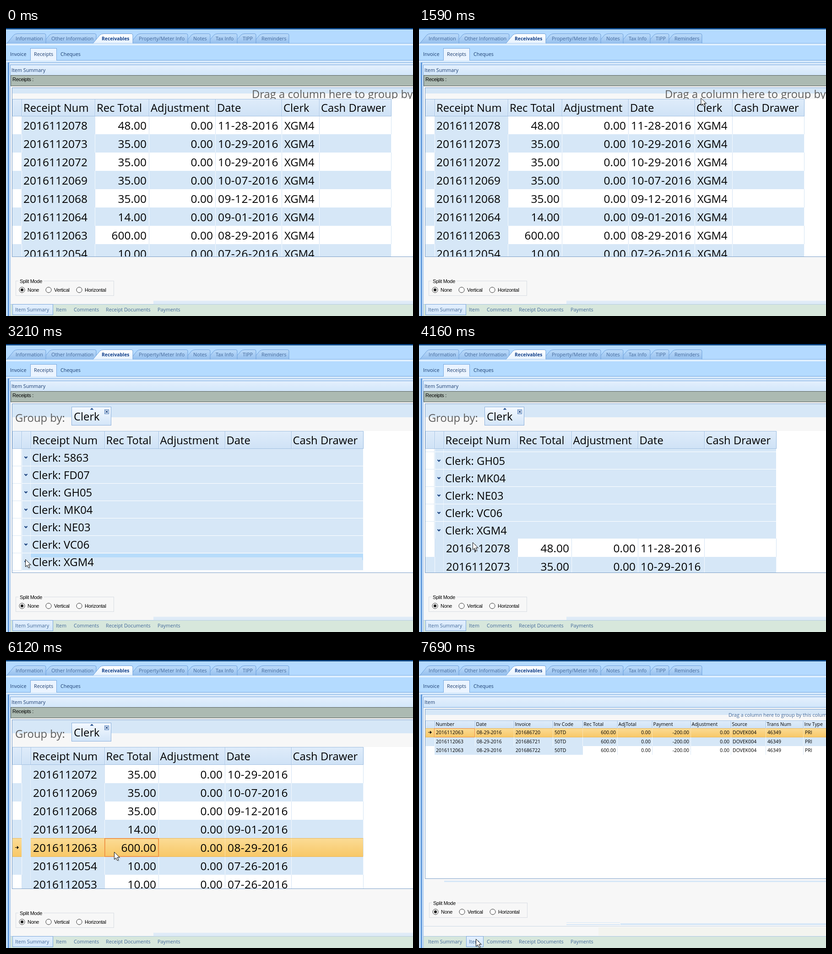
These frames come from a looping animation (889 by 629 pixels, 8000 ms). An HTML page:

```html
<!DOCTYPE html>
<html lang="en">
<head>
<meta charset="utf-8">
<title>Receipts grid</title>
<style>
html, body { margin: 0; width: 100%; height: 100%; overflow: hidden; background: #f7f7f7; }
svg { display: block; width: 889px; height: 629px; }
rect { shape-rendering: crispEdges; }
text { font-family: "Open Sans", "Noto Sans", sans-serif; white-space: pre; }
.big { font-size: 23.8px; fill: #000; }
.num { font-size: 24.5px; fill: #000; }
.date { font-size: 24.5px; fill: #000; letter-spacing: .4px; }
.hint { fill: #5c5c5c; }
.tab { font-size: 10.8px; fill: #44699a; }
.on { font-weight: 700; fill: #15428b; font-size: 10.3px; }
.nav { font-size: 10.8px; fill: #1b3d70; }
.cell { font-size: 10.5px; fill: #000; }
.form { font: 11px "Liberation Sans", Arial, sans-serif; letter-spacing: -.3px; fill: #000; }

.anim, .scene { animation: 8s infinite step-end; }
.flat { animation-name: flat; }
.grouped { animation-name: grouped; }
.item { animation-name: item; }
.summary { animation-name: summary; }
.hover { animation-name: hover; }
.children { animation-name: children; }
.picked { animation-name: picked; }
.scroll { animation-name: scroll; }
#cursor { animation: move 8s infinite ease-in-out, appear 8s infinite step-end; }

@keyframes flat { 0% { visibility: visible } 25.5%, 100% { visibility: hidden } }
@keyframes grouped { 0% { visibility: hidden } 25.5% { visibility: visible } 96.125%, 100% { visibility: hidden } }
@keyframes item { 0% { visibility: hidden } 96.125%, 100% { visibility: visible } }
@keyframes summary { 0% { visibility: visible } 96.125%, 100% { visibility: hidden } }
@keyframes hover { 0% { opacity: 0 } 39.375% { opacity: 1 } 50.375%, 100% { opacity: 0 } }
@keyframes children { 0% { opacity: 0 } 50.375%, 100% { opacity: 1 } }
@keyframes picked { 0% { opacity: 0 } 76.5%, 100% { opacity: 1 } }
@keyframes scroll {
  0% { transform: translateY(0) }
  50.375% { transform: translateY(-69px) }
  53.625% { transform: translateY(-138px) }
  57.75% { transform: translateY(-207px) }
  58.5% { transform: translateY(-276px) }
  65%, 100% { transform: translateY(-345px) }
}
@keyframes appear { 0% { visibility: hidden } 2.5%, 100% { visibility: visible } }
@keyframes move {
  0%, 2.5% { transform: translate(11px, 122px); animation-timing-function: ease-in }
  5.5% { transform: translate(380px, 140px); animation-timing-function: ease-out }
  8.5% { transform: translate(753px, 158px) }
  10.75%, 13.875% { transform: translate(642px, 170px) }
  23%, 29.5% { transform: translate(607px, 147px) }
  39.375%, 43% { transform: translate(42px, 470px) }
  49.625%, 64.125% { transform: translate(117px, 433px) }
  71.625%, 82.25% { transform: translate(236px, 419px) }
  92.125%, 100% { transform: translate(124px, 609px) }
}
</style>
</head>
<body>
<svg id="stage" viewBox="0 0 889 629" xmlns="http://www.w3.org/2000/svg"></svg>
<script>
const BLUE = '#d6e7f7', LINE = '#a3c1e2', EDGE = '#7b9fc9';

const rect = (x, y, w, h, fill, stroke) => stroke
  ? `<rect x="${x + .5}" y="${y + .5}" width="${w - 1}" height="${h - 1}" fill="${fill}" stroke="${stroke}"/>`
  : `<rect x="${x}" y="${y}" width="${w}" height="${h}" fill="${fill}"/>`;
const text = (x, y, s, cls, end) =>
  `<text x="${x}" y="${y}" class="${cls}"${end ? ' text-anchor="end"' : ''}>${s}</text>`;
const path = (d, fill, stroke = 'none', width = 1) =>
  `<path d="${d}" fill="${fill}" stroke="${stroke}" stroke-width="${width}"/>`;
const group = (cls, body) => `<g class="${cls}">${body}</g>`;
const grad = (id, top, bottom) =>
  `<linearGradient id="${id}" x1="0" y1="0" x2="0" y2="1"><stop stop-color="${top}"/><stop offset="1" stop-color="${bottom}"/></linearGradient>`;
const clip = (id, x, y, w, h) =>
  `<clipPath id="${id}"><rect x="${x}" y="${y}" width="${w}" height="${h}"/></clipPath>`;
const marker = (x, y) => path(`M${x} ${y}h4v-3l4 3.5l-4 3.5v-3h-4z`, '#000');

const receipts = [
  ['2078', '48.00', '11-28-2016'], ['2073', '35.00', '10-29-2016'],
  ['2072', '35.00', '10-29-2016'], ['2069', '35.00', '10-07-2016'],
  ['2068', '35.00', '09-12-2016'], ['2064', '14.00', '09-01-2016'],
  ['2063', '600.00', '08-29-2016'], ['2054', '10.00', '07-26-2016'],
  ['2053', '10.00', '07-26-2016']
];
const clerks = ['5863', 'FD07', 'GH05', 'MK04', 'NE03', 'VC06', 'XGM4'];
const flatCols = [34, 194, 312, 457, 602, 684, 841];
const groupCols = [54, 215, 333, 478, 623, 780];

function header(y, h, cols, names, base, cls, pad) {
  const edges = [14, ...cols], first = cols.length - 1 - names.length;
  let out = rect(14, y, edges.at(-1) - 14, h, 'url(#head)');
  for (const x of edges) out += rect(x, y, 1, h, LINE) + rect(x + 1, y + 1, 1, h - 2, '#eef6fe');
  out += rect(14, y, edges.at(-1) - 13, 1, LINE) + rect(14, y + h - 1, edges.at(-1) - 13, 1, LINE);
  names.forEach((s, i) => out += text(cols[first + i] + pad, base, s, cls));
  return out;
}

function rowText(y, r, c) {
  const base = y + 30, left = c[0] === 54 ? 59 : 38;
  return text(left, base, '201611' + r[0], 'num') + text(c[2] - 5, base, r[1], 'num', 1) +
    text(c[3] - 5, base, '0.00', 'num', 1) + text(c[3] + 6, base, r[2], 'date');
}

function dataRow(y, i, r, c) {
  const odd = i % 2, right = c.at(-1);
  let out = rect(14, y, right - 14, 40, odd ? BLUE : '#fff') + rect(34, y, c[1] - 34, 40, BLUE);
  for (const x of [34, ...c.slice(1)]) out += rect(x, y, 1, 40, odd ? '#f4f9fe' : '#d3e3f3');
  if (c[0] === 54) out += rect(53, y, 1, 40, '#e6f0fa');
  return out + rowText(y, r, c);
}

function tab(label, x, right, active) {
  const top = 12.5, d = `M${x - 19} 33.5L${x - 4} 15.5Q${x - 1} ${top} ${x + 4} ${top}H${right - 3}Q${right} ${top} ${right} 16V33.5`;
  return path(d, active ? 'url(#tabOn)' : 'url(#tabOff)', '#6c9fda') +
    text(x, 27, label, active ? 'tab on' : 'tab');
}

function frame() {
  let out = rect(0, 0, 889, 629, '#f7f7f7') + rect(0, 0, 889, 36, '#b4daff') +
    rect(0, 0, 889, 3, '#0c447f') + rect(0, 33, 889, 1, '#7eb0e6') + rect(0, 34, 889, 4, '#e0f0ff') +
    rect(0, 38, 889, 33, '#b4dbff') + rect(0, 70, 889, 1, '#78a9df') + rect(0, 71, 889, 4, '#d8eafc');
  const tabs = [['Information', 21, 87], ['Other Information', 99, 197], ['Property/Meter Info', 290, 397],
    ['Notes', 409, 446], ['Tax Info', 458, 505], ['TIPP', 517, 546], ['Reminders', 558, 618]];
  for (const t of tabs.reverse()) out += tab(...t);
  out += tab('Receivables', 209, 277, true);
  out += rect(53, 44, 58, 27, '#ebf4ff', '#78a9df') + rect(54, 70, 56, 1, '#ebf4ff');
  out += text(9, 61, 'Invoice', 'nav') + text(61, 61, 'Receipts', 'nav') + text(119, 61, 'Cheques', 'nav');
  out += rect(0, 75, 4, 554, '#bcdbf8') + rect(4, 75, 885, 1, '#78a9df') + rect(4, 76, 885, 4, '#dcebfb') +
    rect(4, 75, 3, 554, '#6199dc') + rect(7, 80, 2, 549, '#dcebfb') + rect(9, 80, 1, 549, '#8fb6e4');
  out += rect(9, 80, 890, 24, 'url(#caption)', '#70a4df');
  out += rect(10, 603, 879, 26, '#d7e7dc') + rect(10, 603, 879, 1, '#aac6e2');
  return out;
}

function bottomTabs(x, w) {
  const labels = [['Item Summary', 20], ['Item', 109], ['Comments', 148], ['Receipt Documents', 218], ['Payments', 331]];
  return rect(x, 603, w, 24, 'url(#caption)', '#79a6dd') +
    labels.map(([s, tx]) => text(tx, 619, s, 'tab')).join('');
}

function splitMode(dx, dy) {
  const modes = [['None', 35], ['Vertical', 93], ['Horizontal', 160]];
  let out = rect(21, 552, 215, 33, 'none', '#d8dde3') + rect(27, 550, 55, 6, '#f7f7f7') + text(30, 557, 'Split Mode', 'form');
  modes.forEach(([s, x], i) => {
    out += `<circle cx="${x}" cy="572" r="6" fill="#fff" stroke="#333"/>`;
    if (!i) out += `<circle cx="${x}" cy="572" r="3.2" fill="#222"/>`;
    out += text(x + 12, 576, s, 'form');
  });
  return `<g transform="translate(${dx} ${dy})">${out}</g>`;
}

const summaryPage = () =>
  text(12, 96, 'Item Summary', 'nav') + rect(10, 103, 890, 24, '#acbab2', '#59615d') +
  text(14, 116, 'Receipts :', 'form') + rect(13, 130, 890, 370, '#fff', EDGE) +
  splitMode(0, 0) + rect(322, 596, 567, 2, BLUE) + rect(322, 599, 567, 3, BLUE) + bottomTabs(14, 89);

function flatGrid() {
  const names = ['Receipt Num', 'Rec Total', 'Adjustment', 'Date', 'Clerk', 'Cash Drawer'];
  const rows = receipts.slice(0, 8).map((r, i) =>
    dataRow(192 + 40 * i, i, r, flatCols) + text(608, 222 + 40 * i, clerks[6], 'big')).join('');
  return rect(14, 131, 875, 12, BLUE) + rect(14, 143, 875, 12, '#f7f7f7') +
    `<g clip-path="url(#hintClip)">${text(537, 153, 'Drag a column here to group by this column', 'big hint')}</g>` +
    `<g clip-path="url(#flatClip)">${rows}</g>` + header(155, 38, flatCols, names, 183, 'big', 4);
}

function groupRow(name, i) {
  const y = 229 + 38 * i;
  return rect(14, y, 766, 38, '#fff') + rect(14, y + 37, 20, 1, '#dbe8f5') + rect(33, y, 1, 38, '#d3e3f3') +
    rect(35, y, 745, 37, BLUE) + rect(53, y, 1, 37, '#eaf3fc') +
    path(`M40.5 ${y + 17}l3 3l3 -3`, 'none', '#123a78', 2) + text(57, y + 28, 'Clerk: ' + name, 'big');
}

function pickedRow() {
  const y = 734;
  return rect(14, y, 20, 41, 'url(#gold)') + rect(54, y, 726, 41, 'url(#gold)') +
    [333, 478, 623].map(x => rect(x, y, 1, 41, '#fbe2ad')).join('') +
    rect(14, y, 766, 1, '#eab85c') + rect(14, y + 40, 766, 1, '#eab85c') + rect(34, y, 20, 41, BLUE) +
    rect(215, y, 119, 41, 'none', '#ee8a3a') + rect(216, y + 1, 117, 39, 'none', '#f3a558') +
    marker(20, y + 20) + rowText(y, receipts[6], groupCols);
}

function groupedGrid() {
  const names = ['Receipt Num', 'Rec Total', 'Adjustment', 'Date', 'Cash Drawer'];
  const rows = receipts.map((r, i) => dataRow(494 + 40 * i, i, r, groupCols)).join('');
  const content = clerks.map(groupRow).join('') +
    group('anim hover', rect(54, 458, 726, 8, '#b7dcfb') + rect(778, 466, 2, 6, '#b7dcfb')) +
    group('anim children', rows) + group('anim picked', pickedRow());
  return rect(14, 131, 875, 29, BLUE) + rect(14, 160, 875, 30, '#f7f7f7') +
    text(20, 170, 'Group by:', 'big hint') +
    rect(143, 137, 87, 41, 'url(#chip)', '#8db1dc') + text(148, 167, 'Clerk', 'big') +
    path('M183.5 143.5l4 -4l4 4z', '#1c4a8c') + rect(215, 143, 10, 10, '#eaf3fd', '#4b79b8') +
    path('M217.5 145.5l5 5m0 -5l-5 5', 'none', '#123a78', 1.3) +
    `<g clip-path="url(#groupClip)">${group('anim scroll', content)}</g>` +
    header(190, 39, [34, ...groupCols], names, 219, 'big', 3.5);
}

function itemPage() {
  const cols = [34, 122, 207, 292, 357, 433, 509, 593, 681, 757, 839, 920];
  const names = ['Number', 'Date', 'Invoice', 'Inv Code', 'Rec Total', 'AdjTotal', 'Payment', 'Adjustment', 'Source', 'Trans Num', 'Inv Type'];
  let out = text(12, 96, 'Item', 'nav') + rect(13, 107, 890, 371, '#fff', EDGE) +
    rect(14, 108, 875, 12, BLUE) + rect(14, 120, 875, 12, '#f7f7f7') +
    text(676, 124, 'Drag a column here to group by this column', 'tab hint') +
    header(132, 18, cols, names, 144, 'cell', 2.5);
  for (let i = 0; i < 3; i++) {
    const y = [149, 169, 188][i], h = i ? 19 : 20, base = [162, 182, 201][i];
    out += rect(14, y, 875, h, i ? (i % 2 ? BLUE : '#fff') : 'url(#gold)');
    if (i) out += rect(34, y, 323, h, BLUE);
    else out += rect(14, y, 875, 1, '#eab85c') + rect(14, y + h - 1, 875, 1, '#eab85c');
    for (const x of cols) out += rect(x, y, 1, h, i ? (i % 2 ? '#f4f9fe' : '#d9e7f5') : '#fbe2ad');
    const cells = ['2016112063', '08-29-2016', '20168672' + i, '50TD', '600.00', '0.00', '-200.00', '0.00', 'DOVEK004', '46349', 'PRI'];
    cells.forEach((s, k) => {
      const right = k > 3 && k < 8;
      out += text(right ? cols[k + 1] - 3 : cols[k] + (k ? 4 : 3), base, s, 'cell', right);
    });
  }
  out += rect(33, 149, 89, 20, 'none', '#ee8a3a') + marker(20, 157.5);
  out += rect(55, 482, 834, 3, BLUE) + splitMode(1, -22);
  out += rect(322, 573, 117, 1, BLUE) + rect(322, 577, 117, 2, BLUE) + rect(440, 575, 449, 4, BLUE) +
    rect(10, 581, 879, 1, '#cbd9e6') + rect(392, 584, 497, 18, '#f3f4ef');
  return out + bottomTabs(103, 38);
}

const cursor = '<g id="cursor">' +
  path('M2 2v17l4 -4l3 6l3 -1.5l-3 -6h6z', 'rgba(0,0,0,.18)') +
  path('M.5 .5V16.5L4.2 13L7 19L9.7 17.8L7 12H12z', '#fff', '#111') + '</g>';

document.getElementById('stage').innerHTML =
  '<defs>' + grad('head', '#dfecfa', '#cfe2f6') + grad('caption', '#e4f0fd', '#d2e6fa') +
  grad('tabOff', '#bcdbfa', '#96c0ee') + grad('tabOn', '#ffffff', '#e6f2ff') +
  grad('chip', '#f4f9ff', '#d3e5f8') + grad('gold', '#fbdc96', '#f8c766') +
  clip('hintClip', 14, 131, 875, 24) + clip('flatClip', 14, 192, 875, 307) + clip('groupClip', 14, 229, 875, 270) +
  '</defs>' + frame() + group('scene summary', summaryPage()) + group('scene flat', flatGrid()) +
  group('scene grouped', groupedGrid()) + group('scene item', itemPage()) + cursor;
</script>
</body>
</html>
```
